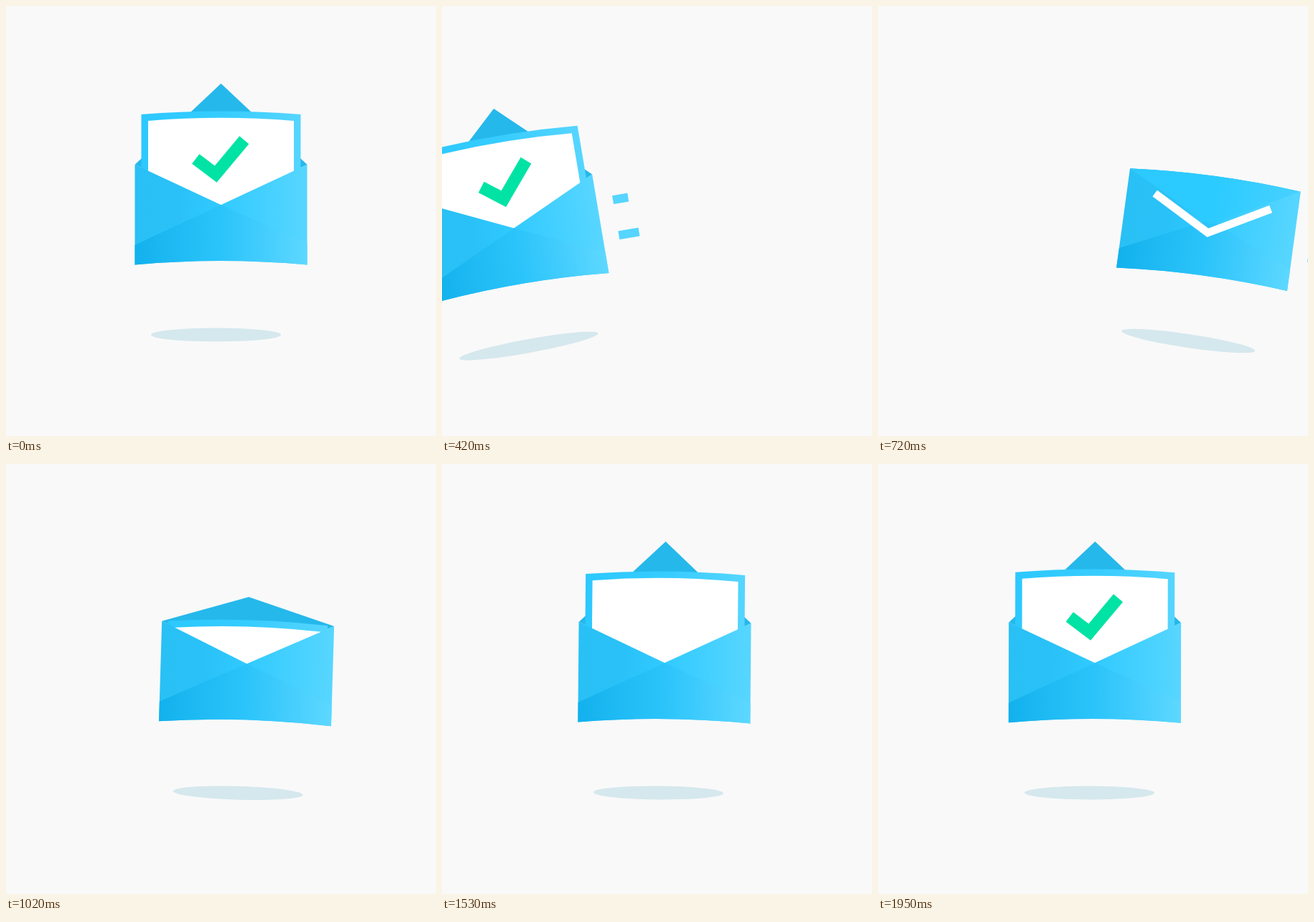
An HTML page with a canvas that plays this animation: 599x599 px, repeating every 1.98 s.

```html
<!DOCTYPE html>
<html lang="en">
<head>
<meta charset="utf-8">
<title>Envelope carousel</title>
<style>
  html, body { margin: 0; width: 100%; height: 100%; overflow: hidden; background: #f9f9f9; }
  canvas { display: block; width: 599px; height: 599px; }
</style>
</head>
<body>
<canvas id="stage"></canvas>
<script>
const SIZE = 599, LOOP = 1980, STEPS = 55;
const HUB = { x: 299.5, y: 1490 };   // wheel centre, far below the stage
const HALF = 120, TOP = 221, TIP = 277, BASE = 360.5;

const canvas = document.getElementById('stage');
const ctx = canvas.getContext('2d');
const dpr = window.devicePixelRatio || 1;
canvas.width = canvas.height = Math.round(SIZE * dpr);

// Key tables: [step, value]
const TURN = [[13, 26.8], [15, 20], [17, 13.9], [20, 7.78], [23, 4.4], [25, 2.95], [28, 1.7],
  [30, 1.3], [35, .85], [42, .5], [45, .4], [54, .12], [55, 0]];
const DROP = [[13, 38], [15, 28], [20, 10], [28, .8], [34, 0]];
const LETTER = [[28, 69.5], [30.5, 59], [33, 34], [36, 16], [39, 7], [42, 3], [47, .5], [51, 0]];
const STRETCH = [[13, 114], [15, 110], [20, 94], [28, 90.5]];

const clamp = v => Math.min(1, Math.max(0, v));
const ease = (n, a, b) => (1 - Math.cos(Math.PI * clamp((n - a) / (b - a)))) / 2;

// Monotone cubic through the keys
function curve(keys, n) {
  const last = keys.length - 1;
  if (n <= keys[0][0]) return keys[0][1];
  if (n >= keys[last][0]) return keys[last][1];
  const slope = i => (keys[i + 1][1] - keys[i][1]) / (keys[i + 1][0] - keys[i][0]);
  const tangent = i => {
    if (i === 0) return slope(0);
    if (i === last) return slope(last - 1);
    const a = slope(i - 1), b = slope(i);
    return a * b <= 0 ? 0 : 2 * a * b / (a + b);
  };
  let i = 0;
  while (n > keys[i + 1][0]) i++;
  const [x0, y0] = keys[i], [x1, y1] = keys[i + 1];
  const w = x1 - x0, u = (n - x0) / w, v = 1 - u;
  return y0 * (1 + 2 * u) * v * v + w * tangent(i) * u * v * v +
    y1 * u * u * (3 - 2 * u) - w * tangent(i + 1) * u * u * v;
}

// All shapes use x from the envelope's middle and stage y
function gradient(...colors) {
  const g = ctx.createLinearGradient(-HALF, 0, HALF, 0);
  colors.forEach((c, i) => g.addColorStop(i / (colors.length - 1), c));
  return g;
}

function fillPath(color, points) {
  ctx.beginPath();
  points.forEach(p => p.length === 4 ? ctx.quadraticCurveTo(...p) : ctx.lineTo(...p));
  ctx.closePath();
  ctx.fillStyle = color;
  ctx.fill();
}

function strokePath(color, width, points) {
  ctx.beginPath();
  points.forEach(p => ctx.lineTo(...p));
  ctx.strokeStyle = color;
  ctx.lineWidth = width;
  ctx.stroke();
}

// Sheet with an arched top edge
function sheet(color, half, top, rise) {
  fillPath(color, [[-half, top], [0, top - 2 * rise, half, top], [half, 281], [-half, 281]]);
}

function drawLetter(offset, check) {
  ctx.save();
  ctx.translate(0, offset);
  sheet(gradient('#2bc8ff', '#36ccff', '#58d6ff'), 111, 151, 4.5);
  sheet('#fff', 101.5, 160, 4.2);
  if (check > 0) {
    ctx.setLineDash([97 * check, 200]);
    strokePath('#00e3a4', 17, [[-35.3, 213], [-7.3, 234.2], [32.5, 186.5]]);
    ctx.setLineDash([]);
  }
  ctx.restore();
}

function drawPocket() {
  const arch = [0, 2 * 355 - BASE, HALF, BASE];
  fillPath(gradient('#29c0f5', '#29c1f7', '#31caff', '#44d0ff', '#57d6ff'),
    [[-HALF, TOP], [0, TIP], [HALF, TOP], [HALF, BASE], [0, arch[1], -HALF, BASE]]);
  fillPath(gradient('#12b1ed', '#20bbf4', '#2bc4fa', '#44cdfd', '#5dd8ff'),
    [[-HALF, 333], [0, TIP], [HALF, 331], [HALF, BASE], [0, arch[1], -HALF, BASE]]);
}

function drawFlap(tip, color) {
  fillPath(color, [[-HALF, TOP], [0, TOP - 11, HALF, TOP], [0, tip]]);
}

function drawFrontFlap(tip) {
  const k = (tip - TOP) / 62;
  drawFlap(tip, gradient('#2cc9fd', '#2bcbff', '#48d1ff'));
  const y = v => TOP + (v - TOP) * k;
  strokePath('#fff', 11, [[-81, y(250.5)], [-.5, y(295)], [82, y(250.5)]]);
}

function drawLines(amount) {
  if (amount <= 0) return;
  for (const [y, length] of [[261, 52], [311, 69]])
    strokePath('#55d5ff', 12, [[142.5, y], [142.5 + length * amount, y]]);
}

function drawEnvelope(s) {
  const a = s.turn * Math.PI / 180;
  ctx.save();
  ctx.translate(HUB.x, HUB.y);
  ctx.rotate(a);
  ctx.translate(0, -HUB.y);

  ctx.beginPath();
  ctx.ellipse(-7, 458, s.stretch, 9.5, s.tilt * Math.PI / 180, 0, 7);
  ctx.fillStyle = '#d5e8ee';
  ctx.fill();

  ctx.translate(0, s.drop);
  drawLines(s.lines);
  if (s.tip <= TOP) {
    fillPath('#25b8eb', [[-HALF, TOP], [0, s.tip], [HALF, TOP], [0, TIP]]);
  } else {
    fillPath('#25b8eb', [[-HALF, TOP], [0, TOP - 11, HALF, TOP], [0, TIP]]);
  }
  drawLetter(s.letter, s.check);
  drawPocket();
  if (s.tip > TOP) drawFrontFlap(s.tip);
  ctx.restore();
}

function leaving(n) {
  const u = n / 15;
  return {
    turn: -21.4 * u ** 2.59,
    drop: 41 * u ** 3.06,
    stretch: 90.5 + 28 * u ** 4.2,
    tilt: -Math.sin(Math.PI * clamp(u)),
    lines: ease(n, 9, 13.5),
    tip: 108, letter: 0, check: 1
  };
}

function arriving(n) {
  return {
    turn: curve(TURN, n),
    drop: curve(DROP, n),
    stretch: curve(STRETCH, n),
    tilt: n < 15 ? -1.4 : curve([[15, -1.4], [20, .7], [28, 0]], n),
    lines: 1 - ease(n, 20, 24.5),
    tip: 283 - 175 * ease(n, 23.5, 31.8),
    letter: curve(LETTER, n),
    check: ease(n, 43, 50.5)
  };
}

// Five drawings per 180 ms; the first one is held twice as long
function stepAt(ms) {
  const slot = Math.floor(ms % 180 / 30);
  return Math.floor(ms / 180) * 5 + Math.max(0, slot - 1);
}

function draw(ms) {
  const n = stepAt(ms) % STEPS;
  ctx.setTransform(dpr, 0, 0, dpr, 0, 0);
  ctx.fillStyle = '#f9f9f9';
  ctx.fillRect(0, 0, SIZE, SIZE);
  if (n < 20) drawEnvelope(leaving(n));
  if (n >= 13) drawEnvelope(arriving(n));
}

const start = performance.now();
function tick() {
  draw((performance.now() - start) % LOOP);
  requestAnimationFrame(tick);
}
tick();
</script>
</body>
</html>
```
